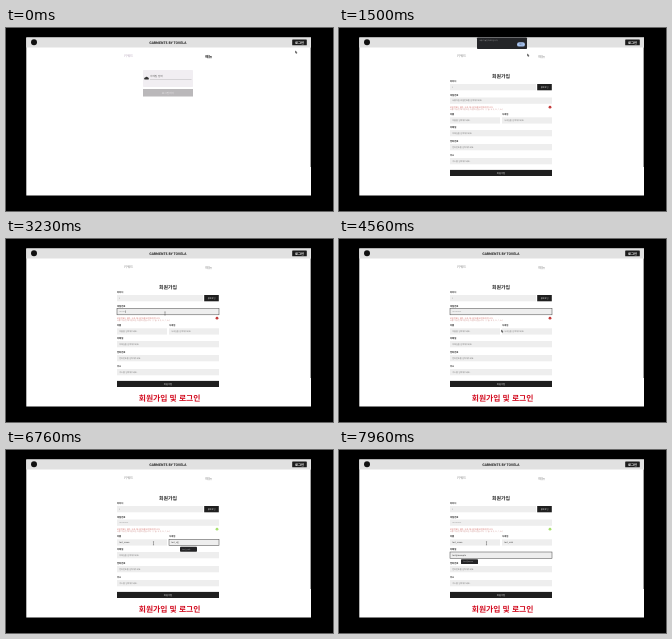
An HTML page that plays this animation: 327x183 px, repeating every 8 s.

```html
<!DOCTYPE html>
<html lang="ko">
<head>
<meta charset="utf-8">
<title>회원가입</title>
<style>
  html, body { margin: 0; width: 100%; height: 100%; overflow: hidden; background: #000; }
  svg { display: block; width: 327px; height: 183px; }
  text { font-family: "Noto Sans CJK KR", "Noto Sans CJK", "Noto Sans", sans-serif; text-rendering: geometricPrecision; white-space: pre; }
</style>
</head>
<body>
<svg id="stage" viewBox="0 0 327 183"></svg>
<script>
const LOOP = 8000;
const stage = document.getElementById('stage');

function add(parent, tag, attrs) {
  const el = document.createElementNS('http://www.w3.org/2000/svg', tag);
  for (const k in attrs) el.setAttribute(k, attrs[k]);
  return parent.appendChild(el);
}
const group = (parent = stage) => add(parent, 'g', {});
const box = (g, x, y, w, h, fill, more) =>
  add(g, 'rect', { x, y, width: w, height: h, fill, ...more });

// y is the vertical middle of the line
function label(g, x, y, str, size, fill, more) {
  const el = add(g, 'text', { x, y: y + size * 0.37, 'font-size': size, fill, ...more });
  el.textContent = str;
  return el;
}
const bold = { 'font-weight': 700 };
const mid = { 'text-anchor': 'middle' };
const boldMid = { ...bold, ...mid };
const show = (el, on) => el.setAttribute('visibility', on ? 'visible' : 'hidden');

// Frame and header
box(stage, 20.3, 9.5, 284.7, 158, '#fff');
box(stage, 20.3, 9.5, 284.7, 10, '#e1e1e1');
add(stage, 'circle', { cx: 28, cy: 14.2, r: 3, fill: '#111' });
label(stage, 161.8, 14.4, 'GARMENTS BY TOVELA', 3.35, '#111', boldMid);
box(stage, 286.2, 11.6, 14.6, 5.7, '#1c1c1c', { rx: 0.4 });
label(stage, 293.5, 14.4, '로그인', 3.3, '#fff', boldMid);
box(stage, 304, 19.5, 1, 119.5, '#a4a4a4');
const tabs = [
  label(stage, 122.5, 28.2, '키워드', 3.5, '#888', mid),
  label(stage, 202.7, 28.2, '메뉴', 3.7, '#888', mid)
];

// Login page
const login = group();
box(login, 137, 42, 50, 17, '#f1eef2', { rx: 0.8 });
add(login, 'path', { d: 'M138.6 51.6a1.1 1.1 0 0 1 .7-2a1.4 1.4 0 0 1 2.6 0a1.1 1.1 0 0 1 .5 2z', fill: '#333' });
label(login, 144, 48.4, '이메일 입력', 2.6, '#666');
box(login, 144, 51.2, 41.5, 0.4, '#aaa');
box(login, 137, 61, 50, 7.5, '#bab8ba');
label(login, 162, 64.8, '로그인하기', 2.7, '#e6e4e6', mid);

// Sign-up page
const signup = group();
label(signup, 162, 48, '회원가입', 4.9, '#222', boldMid);

function field(name, hint, x, y, w) {
  label(signup, x, y - 2.8, name, 2.3, '#222', bold);
  const frame = box(signup, x, y, w, 6.3, '#eeeeee');
  const text = label(signup, x + 2.2, y + 3.2, hint, 2.05, '#777');
  const caret = box(signup, x + 2.2, y + 1.9, 0.35, 2.6, '#444', { visibility: 'hidden' });
  return { hint, x, frame, text, caret };
}
const id = field('아이디', 't', 111, 56, 86);
const pass = field('비밀번호', '사용하실 비밀번호를 입력해주세요.', 111, 69.5, 102);
const user = field('이름', '이름을 입력해주세요.', 111, 89.3, 50);
const nick = field('닉네임', '닉네임을 입력해주세요.', 163, 89.3, 50);
const mail = field('이메일', '이메일을 입력해주세요.', 111, 102, 102);
field('전화번호', '전화번호를 입력해주세요.', 111, 116, 102);
field('주소', '주소를 입력해주세요.', 111, 130, 102);

box(signup, 198.2, 56, 14.6, 6.3, '#1f1f1f');
label(signup, 205.5, 59.2, '중복확인', 2.1, '#eee', mid);
label(signup, 111, 79, '비밀번호는 영문, 숫자, 특수문자를 포함해야 합니다.', 2, '#d0625c');
label(signup, 111, 81.7, '사용 가능한 특수문자는 다음과 같습니다. ( !, @, #, $, %, ^, & )', 2, '#c98a86');
const lamp = add(signup, 'circle', { cx: 211, cy: 79.2, r: 1.4 });
box(signup, 111, 141.9, 102, 6.1, '#1f1f1f');
label(signup, 162, 145, '회원가입', 2.3, '#eee', mid);

// Autofill menus
function menu(x, y, items) {
  const g = group(signup);
  box(g, x, y, 17, items.length * 3.9 + 1, '#242426', { rx: 0.7 });
  items.forEach((s, i) => label(g, x + 2.2, y + 2.4 + i * 3.9, s, 1.9, '#aaa'));
  return g;
}

// Each entry: typed text, focus span, typing span, menu
const entries = [
  { f: pass, str: '•'.repeat(13), focus: [1960, 4900], type: [2480, 3560], tint: '#666' },
  { f: user, str: 'test_name', focus: [4900, 6080], type: [5080, 5930], tint: '#333',
    menu: menu(122, 96.8, ['test_nam', 'test_na']) },
  { f: nick, str: 'test_nick', focus: [6080, 7080], type: [6220, 6840], tint: '#333',
    menu: menu(174, 96.8, ['test_nick']) },
  { f: mail, str: 'test@example', focus: [7080, LOOP], type: [7220, 7950], tint: '#333',
    menu: menu(122, 109.2, ['test@exam']) }
];

// Browser alert
const alertBox = group();
box(alertBox, 138, 9.5, 50, 11.5, '#242528', { rx: 0.8 });
label(alertBox, 140.5, 12.2, '사용 가능한 아이디입니다.', 1.7, '#aaa');
box(alertBox, 178, 14.2, 8, 4.4, '#a9c4ee', { rx: 2.2 });
label(alertBox, 182, 16.4, '확인', 2, '#25364f', mid);

const TITLE = '회원가입 및 로그인';
const caption = label(stage, 163.6, 159, '', 7.8, '#d20a1e', boldMid);

const pointer = group();
const arrow = add(pointer, 'path', { d: 'M-.8-1.6v3.1l.8-.7.6 1.2.6-.3-.6-1.1h1z', fill: '#333', stroke: '#fff', 'stroke-width': 0.2 });
const beam = add(pointer, 'path', { d: 'M-.6-1.6H.6M0-1.6V1.6M-.6 1.6H.6', stroke: '#444', 'stroke-width': 0.4 });

// time, x, y
const route = [
  [0, 290, 24], [60, 290, 24], [360, 293, 16], [460, 293, 16], [760, 205, 60],
  [1200, 205, 60], [1500, 189, 27], [1640, 183, 17], [1760, 183, 17], [1960, 159, 74.5],
  [4400, 159, 74.5], [4560, 163, 92], [4730, 147.5, 93.3], [LOOP, 147.5, 93.3]
];

function movePointer(t) {
  const i = route.findIndex(p => p[0] > t);
  const [t0, x0, y0] = route[i - 1], [t1, x1, y1] = route[i];
  const p = (t - t0) / (t1 - t0), k = p * p * (3 - 2 * p);
  pointer.setAttribute('transform', `translate(${x0 + (x1 - x0) * k} ${y0 + (y1 - y0) * k})`);
  const overText = (t >= 1930 && t < 4470) || t >= 4650;
  show(arrow, !overText);
  show(beam, overText);
}

function drawEntry(e, t) {
  const { f, str, focus, type } = e;
  const active = t >= focus[0] && t < focus[1];
  const p = (t - type[0]) / (type[1] - type[0]);
  const n = p < 0 ? 0 : Math.min(str.length, 1 + Math.floor(p * (str.length - 1)));
  f.text.textContent = n ? str.slice(0, n) : active ? '' : f.hint;
  f.text.setAttribute('fill', n ? e.tint : '#777');
  f.frame.setAttribute('stroke', active ? '#444' : 'none');
  f.frame.setAttribute('stroke-width', 0.5);
  show(f.caret, active && n < str.length);
  if (active) f.caret.setAttribute('x', f.x + 2.3 + (n ? f.text.getComputedTextLength() : 0));
  if (e.menu) show(e.menu, active && n > 0);
}

function draw(t) {
  const first = t < 560;
  login.style.display = first ? '' : 'none';
  signup.style.display = first ? 'none' : '';
  tabs[0].setAttribute('fill', first ? '#b9a9bd' : '#888');
  tabs[1].setAttribute('fill', first ? '#111' : '#888');
  tabs[1].setAttribute('font-weight', first ? 700 : 400);
  show(alertBox, t >= 1300 && t < 1760);
  lamp.setAttribute('fill', t < 4700 ? '#c43c3c' : '#a8e070');
  caption.textContent = TITLE.slice(0, Math.max(0, Math.floor((t - 1740) / 58) + 1));
  // Hidden fields stay untouched until their page is shown
  if (!first) entries.forEach(e => drawEntry(e, t));
  movePointer(t);
}

const start = performance.now();
function tick() {
  draw((performance.now() - start) % LOOP);
  requestAnimationFrame(tick);
}
tick();
</script>
</body>
</html>
```
